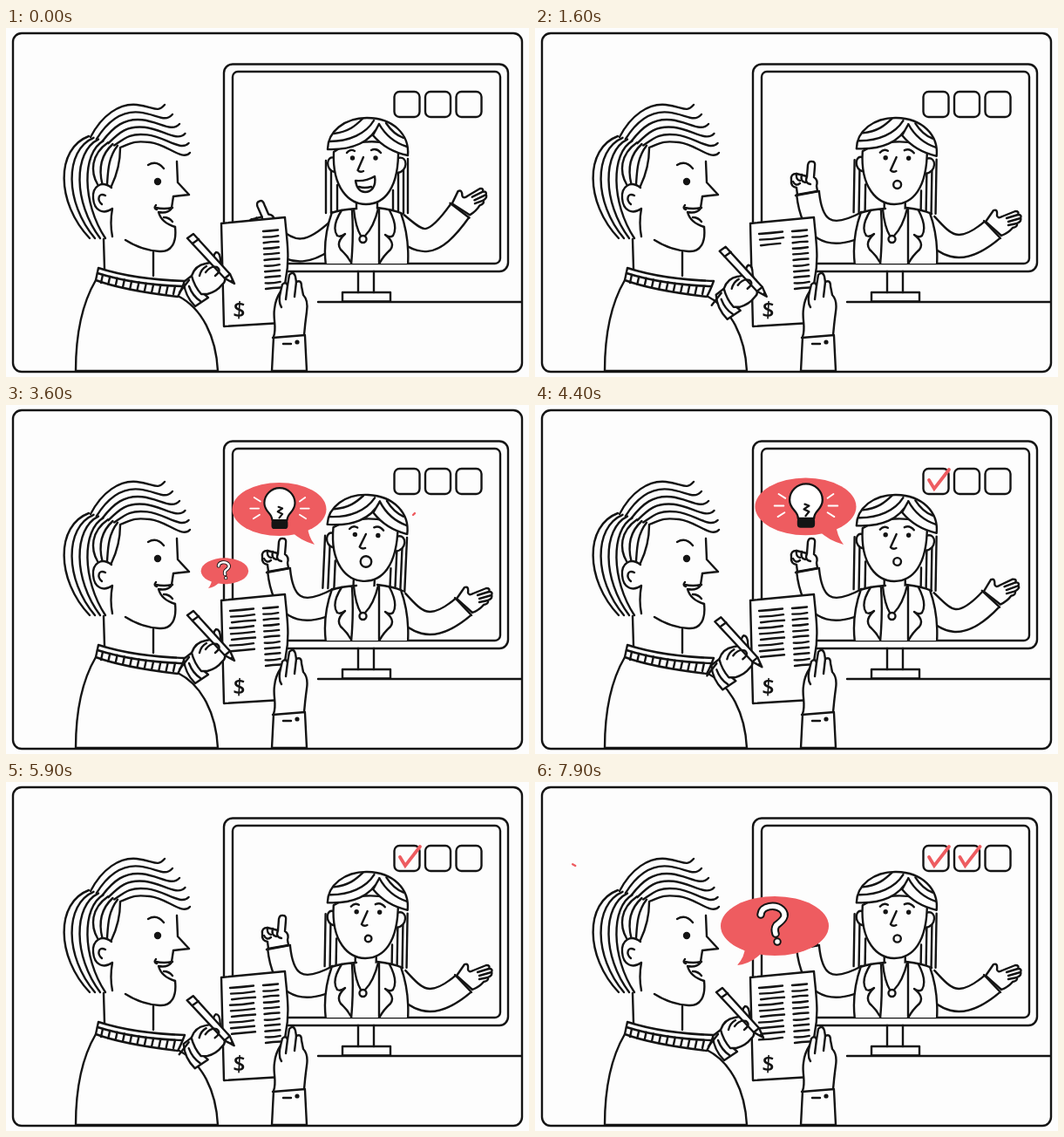
These frames come from a looping animation (600 by 400 pixels, 8 s). An HTML page:

```html
<!DOCTYPE html>
<html lang="en">
<head>
<meta charset="utf-8">
<title>Online advice</title>
<style>
html, body { margin: 0; width: 100%; height: 100%; overflow: hidden; background: #fdfdfd; }
svg { display: block; width: 600px; height: 400px; }
.ink { stroke: #141414; stroke-width: 2.4; fill: none; stroke-linecap: round; stroke-linejoin: round; }
.f { fill: #fdfdfd; }
.k { fill: #141414; stroke: none; }
.n { stroke: none; }
.red { stroke: #ee5c60; fill: none; stroke-linecap: round; }
.bub { fill: #ee5c60; stroke: none; }
.w { stroke: #fff; stroke-width: 2; }
</style>
</head>
<body>
<svg viewBox="0 0 600 400">
<defs>
  <clipPath id="screen"><rect x="261" y="51" width="306" height="219"/></clipPath>
  <path id="q" d="M259 152C260 141 276 140 283 146C291 154 282 160 277 164Q274 168 276 174M278 183V183.1"/>
</defs>
<g class="ink">
  <rect x="8" y="6" width="584" height="388" rx="10"/>
  <path d="M358 314H591"/>
  <rect x="250" y="41.5" width="326" height="237.5" rx="10" class="f"/>
  <rect x="260" y="50" width="307" height="220" rx="6"/>
  <path d="M404 279V303M422 279V303"/>
  <rect x="386" y="303" width="55" height="10.5"/>
  <g id="boxes"></g>

  <g clip-path="url(#screen)">
    <path class="f" d="M402 190V212H426V190"/>
    <g id="head">
      <path class="f n" d="M367 212V150C365 120 386 103 414 103C444 103 463 124 461 154V212Z"/>
      <path class="f n" d="M402 195V212H426V195Z"/>
      <path d="M402 197V212M426 197V212M367 152V212M373 162V212M380 180V212M444 186V212M450 166V212M456 162V212M461 150V212"/>
      <path class="f" d="M377 149C367 145 366 163 377 165M450 149C462 146 461 165 449 166"/>
      <path class="f" d="M376 142C374 184 394 202 413 202C434 202 451 184 450 138C430 125 393 130 376 142Z"/>
      <path class="f" d="M369 139C397 140 419 131 428 110L421 123C432 136 446 143 461 146C463 122 444 103 414 103C388 103 369 119 369 139Z"/>
      <path d="M371 130C394 130 413 121 422 106M376 121C393 119 401 112 409 104M428 110C436 124 447 132 460 136M436 109C442 118 448 123 456 126"/>
      <g id="face">
        <circle class="k" cx="397.5" cy="149" r="2.7"/><circle class="k" cx="424" cy="149" r="2.7"/>
        <path d="M391 143Q395 138 400 141M419 140Q425 137 430 143M410 148L403.5 163Q406 166 410 164"/>
        <path id="smile" class="f" d="M401 175Q413 176 423 170C425 182 419 188 412 188C406 188 402 183 401 175ZM405 182Q411 184 419 182"/>
        <circle id="oh" class="f" cx="411.5" cy="179.5"/>
      </g>
    </g>
    <g id="limbs" stroke-linecap="butt"></g>
    <g id="palm">
      <path class="f" d="M517 222L526 209Q531 207 530 215Q531 219 536 216L551 210Q556 210 554 214Q559 214 557 218Q559 221 553 224Q554 228 548 229Q543 235 535 238Z"/>
      <path d="M554 214L541 218M557 218L543 222M553 224L543 226M515 221L534 241"/>
    </g>
    <g id="point">
      <path class="f" d="M301 191L300 183Q293 182 294 174Q293 167 300 167L312 170L313 157Q314 152 318 153Q322 153 321 159L320 171Q325 174 323 181L324 187Z"/>
      <path d="M300 167Q299 174 304 175M306 168Q304 176 310 177M312 170Q309 178 316 179M296 176Q299 182 304 178M299 192L326 187"/>
    </g>
    <path class="f n" d="M374 211Q385 207 397 207Q412 211 428 207Q443 207 454 213Q462 238 461 272H367Q364 238 374 211"/>
    <path d="M374 211Q363 242 367 272M453 212Q463 240 461 272M373 212Q384 208 402 207M426 206Q444 208 455 213M397 209Q399 239 396 271M428 208V271"/>
    <path d="M385 209Q373 228 380 238Q384 240 389 236Q378 246 384 254Q391 260 396 269M440 209Q450 228 444 238Q440 241 435 237Q447 246 441 254Q433 261 429 269"/>
    <path d="M399 208Q401 228 407 238M427 207Q422 228 412 238"/>
    <circle class="f" cx="409.5" cy="242" r="4"/>
  </g>

  <path class="f" d="M103 289C86 318 80 353 80 393H243C241 354 225 321 197 307"/>
  <path d="M112 242L113 276M169 257V284"/>
  <path class="f" d="M106 275C137 285 172 289 205 290Q201 301 197 308C163 304 130 299 103 289Z"/>
  <path d="M105 281C137 291 172 295 202 296"/>
  <g id="hair"></g>
  <path class="f" d="M121 183C109 174 99 182 100 195C101 210 112 214 122 207M114 192C106 188 104 197 110 202M131 138Q131 160 121 181M122 207Q119 224 122 239"/>
  <path d="M196 153L197 177L210 191L192 193L190 206M194 228C196 246 190 257 176 256C160 255 148 250 137 243"/>
  <path d="M172 203Q169 207 173 208M172 206Q181 208 191 206M190 207Q185 213 175 211Q178 223 194 228M181 217Q187 217 191 222M163 157Q173 151 181 161"/>
  <circle class="k" cx="174" cy="176" r="4.2"/>

  <path class="f" d="M247 224L320 217C322 241 326 263 321 287Q317 310 316 338L250 342Z"/>
  <g id="rows"></g>
  <text class="k" x="260.5" y="332" font-family="'Open Sans',sans-serif" font-size="25" font-weight="600" transform="rotate(3 268 324)">$</text>
  <path class="f" d="M307 354C311 343 306 333 308 322Q309 311 315 302L317 294Q321 290 323 295L325 283Q330 278 332 285L333 291Q339 288 339 296L341 306Q347 312 345 325Q343 340 342 352L343 353L345 393H305Z"/>
  <path d="M323 295L321 311M333 291L331 308M315 302Q312 314 316 320M306 355L343 352M318 362H327"/>
  <circle class="k" cx="334" cy="360" r="2.6"/>

  <g id="pen">
    <path class="f" d="M204 291Q205 307 217 319L232 309Q220 300 213 284Z"/>
    <path d="M199 303L210 289M210 296Q214 307 223 313"/>
    <path class="f" d="M213 284Q217 272 229 270L239 268Q237 260 241 257Q246 257 246 268L249 279Q254 290 248 294Q242 302 231 305L224 305Q216 296 213 284Z"/>
    <path class="f" d="M208 241L215 236L257 282L262 293L251 287Z"/>
    <path d="M214 247L221 242M251 287L257 282"/>
    <path class="k" d="M262 293L257 290L260 287Z"/>
    <path d="M229 280Q235 272 242 274Q248 278 240 284M222 284Q224 276 230 273"/>
  </g>
</g>

<g id="marks"></g>
<g id="ask">
  <path class="bub" d="M241 188Q241 200 232 210Q248 208 260 196Z"/>
  <ellipse class="bub" cx="275" cy="165" rx="62" ry="34"/>
  <g fill="none" stroke-linecap="round" stroke-linejoin="round">
    <use href="#q" stroke="#141414" stroke-width="9.5"/>
    <use href="#q" stroke="#fff" stroke-width="5.5"/>
  </g>
</g>
<g id="idea">
  <path class="bub" d="M325 144Q336 155 354 160Q346 150 345 136Z"/>
  <ellipse class="bub" cx="309" cy="115" rx="60" ry="34"/>
  <g class="ink">
    <path fill="#fff" d="M300 129C300 119 290 119 290 107A19 18.5 0 0 1 329 107C329 119 319 119 319 129Z"/>
    <path d="M308 112L313 114L307 118L313 121L309 126"/>
    <rect class="k" x="299" y="128" width="21" height="12" rx="4"/>
    <path class="w" d="M285 105L277 100M283 114H272M284 122L276 127M335 105L342 100M336 114H347M335 122L343 127"/>
  </g>
</g>
</svg>
<script>
const $ = id => document.getElementById(id);
function add(parent, tag, attrs) {
  const el = document.createElementNS('http://www.w3.org/2000/svg', tag);
  for (const key in attrs) el.setAttribute(key, attrs[key]);
  return $(parent).appendChild(el);
}
const clamp = v => Math.max(0, Math.min(1, v));
const ease = v => (v = clamp(v), v * v * (3 - 2 * v));
const mix = (a, b, p) => a + (b - a) * p;
const show = (el, on) => el.setAttribute('visibility', on ? 'visible' : 'hidden');
const move = (id, x, y, turn = '') => $(id).setAttribute('transform', `translate(${x} ${y}) ${turn}`);
// Rises at a, falls at b, each over the given time.
const pulse = (t, a, b, time = 300) => ease((t - a) / time) - ease((t - b) / time);

for (let i = 0; i < 3; i++)
  add('boxes', 'rect', { x: 445.5 + 35.5 * i, y: 73, width: 29, height: 29, rx: 6 });

// Swept-back locks, then the hair falling behind the ear.
for (let i = 0; i < 6; i++) {
  const u = i / 5, x = mix(97, 131, u), y = mix(125, 137, u);
  const mx = mix(150, 165, u), my = mix(88, 131, u), tx = 182 + 29 * Math.sin(u * 1.57), ty = mix(88, 143, u);
  add('hair', 'path', { d: `M${x} ${y}C${x + 13} ${mix(100, 132, u)} ${mx - 20} ${my - 2} ${mx} ${my}S${tx - 9} ${ty + 10} ${tx} ${ty}` });
}
for (let i = 0; i < 7; i++) {
  const x = 95 + 5.5 * i, y = 124 + 1.8 * i, long = i < 4, bulge = 57 + 10 * i;
  add('hair', 'path', { d: `M${x} ${y}C${bulge} ${y + 14} ${bulge} ${long ? 200 : 165} ${long ? 96 + 6 * i : 83 + 5.5 * i} ${long ? 241 : 179}` });
}
for (let i = 0; i < 11; i++) {
  const x = 111 + 8.3 * i, y = 283 + 13 * Math.sin(i / 7);
  add('hair', 'path', { d: `M${x} ${y}l-2 9` });
}

const leftRows = [];
for (let i = 0; i < 11; i++) {
  const y = 233 + 6.6 * i, bend = Math.sin(i * 2.3);
  add('rows', 'path', { d: `M${295 + i * .3} ${y}q8 ${bend - .5} 17 -1.5` });
  if (i < 10) leftRows.push(add('rows', 'path', {
    d: `M${257 + i % 3} ${y + 3}q14 ${bend - 1} 27 -2.5`, pathLength: 1 }));
}

const checks = [0, 35.5].map(x => add('marks', 'path', {
  class: 'red', d: `M${452 + x} 86L${458 + x} 96L${475 + x} 74`, 'stroke-width': 3.8, pathLength: 1 }));

// Dashes flying out from a centre, one after the other.
const rays = [];
function fan(count, x, y, angle, step, near, far, starts) {
  for (const start of starts)
    for (let i = 0; i < count; i++)
      rays.push({ x, y, near, far, angle: (angle + step * i) * Math.PI / 180, at: start + 150 * i,
        el: add('marks', 'path', { class: 'red', 'stroke-width': 2.4 }) });
}
fan(3, 142, 149, 246, -18.5, 75, 113, [2790, 4820, 7225]);
fan(2, 455, 138, -45, 43, 17, 41, [290, 3570, 6400]);

function drawRay({ x, y, near, far, angle, at, el }, t) {
  const p = (t - at) / 400;
  const spot = k => `${x + mix(near, far, clamp(k)) * Math.cos(angle)} ${y + mix(near, far, clamp(k)) * Math.sin(angle)}`;
  show(el, p > 0 && p < 1);
  el.setAttribute('d', `M${spot(p * 1.5 - .5)}L${spot(p * 1.5)}`);
}

// A sleeve is one curve drawn as a dark band with a light core.
const sleeve = width => [width + 2.4, width - 2.4].map((w, i) =>
  add('limbs', 'path', { stroke: i ? '#fdfdfd' : '#141414', 'stroke-width': w }));
const leftArm = sleeve(26), rightArm = sleeve(26);
const bend = (arm, d) => arm.forEach(el => el.setAttribute('d', d));

function reveal(el, p) {
  show(el, p > 0);
  el.setAttribute('stroke-dasharray', `${clamp(p)} 2`);
}
function pop(id, x, y, s) {
  show($(id), s > .03);
  move(id, x, y, `scale(${s}) translate(${-x} ${-y})`);
}

function draw(t) {
  const low = 1 - ease(t / 400);
  bend(leftArm, `M${313 - 8 * low} ${189 + 50 * low}C${317 + 11 * low} ${228 + 32 * low} ${334 + 14 * low} ${248 + 14 * low} 382 ${222 + 8 * low}`);
  move('point', -9 * low, 44 * low, `rotate(${-28 * low} 312 190)`);

  const high = 1 - ease(t / 450) + .4 * (pulse(t, 2800, 3200) + pulse(t, 3800, 4500));
  bend(rightArm, `M448 224C${468 + 4 * high} ${246 - 3 * high} 484 ${266 - 5 * high} ${525 - 4 * high} ${231 - 22 * high}`);
  move('palm', -4 * high, -22 * high, `rotate(${-9 * high} 525 231)`);

  const lean = pulse(t, 300, 1000, 450) + .3 * pulse(t, 2700, 3500, 450)
    + pulse(t, 4600, 5400, 500) + pulse(t, 6050, 6950, 500);
  $('head').setAttribute('transform', `rotate(${1 + 6 * lean - low} 415 130)`);
  move('face', 5 * (1 - low) * (1 - clamp(lean)), 0);

  const smiling = t < 200 || t >= 2200 && t < 3000;
  show($('smile'), smiling);
  show($('oh'), !smiling);
  $('oh').setAttribute('r', 3.9 + 1.8 * pulse(t, 3350, 3700, 250) + .6 * Math.sin(t / 110));

  const busy = pulse(t, 300, 2450, 250) + pulse(t, 3700, 7600, 250);
  const swing = Math.sin((t - 800) / 733 * 2 * Math.PI);
  move('pen', busy * (1 + 5 * swing) + 5 * pulse(t, 1900, 2450, 250), busy * (11 + 7 * swing));

  const written = 8 * clamp((t - 1000) / 1700) + ease((t - 3800) / 600) + ease((t - 6700) / 600);
  leftRows.forEach((el, i) => reveal(el, written - i));

  pop('ask', 232, 210, pulse(t, 2750, 3400, 370) + pulse(t, 4700, 5550, 370) + pulse(t, 7250, 9000, 370));
  pop('idea', 354, 160, pulse(t, 3230, 4350, 460) + pulse(t, 5950, 6950, 460));
  reveal(checks[0], (t - 4050) / 300);
  reveal(checks[1], (t - 6850) / 300);
  rays.forEach(r => drawRay(r, t));
}

const start = performance.now();
(function frame() {
  draw(Math.floor((performance.now() - start) % 8000 / 100) * 100);
  requestAnimationFrame(frame);
})();
</script>
</body>
</html>
```
